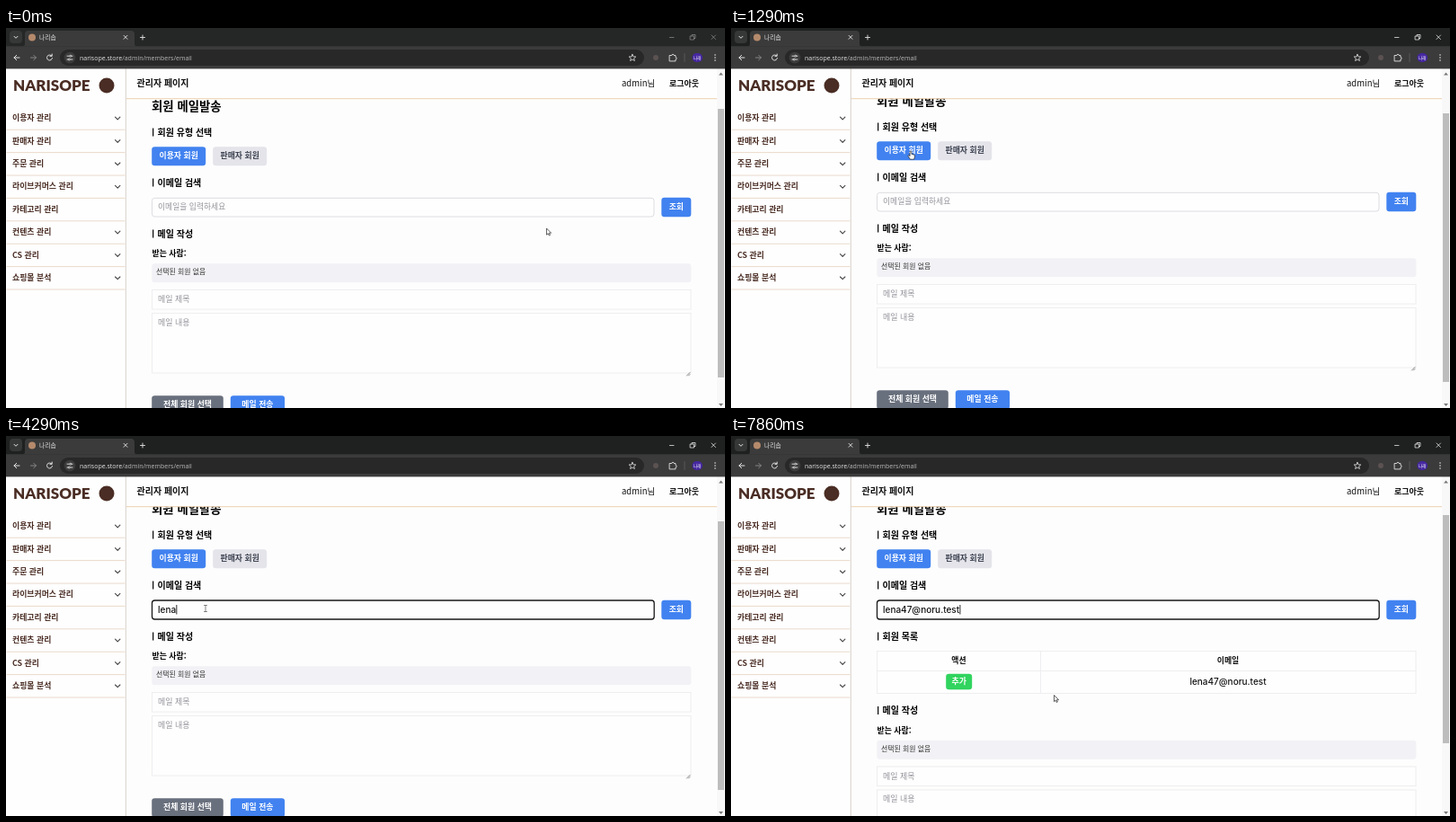
Recreate the animation shown at these times as an HTML page. Size 800 px wide and 423 px high, loop 8 s.

```html
<!DOCTYPE html>
<html lang="ko">
<head>
<meta charset="utf-8">
<style>
  html, body { margin: 0; width: 100%; height: 100%; overflow: hidden; background: #fdfdfd; }
  svg { display: block; font-family: "Noto Sans CJK KR", "Noto Sans", sans-serif; }
  text { white-space: pre; }
  .url { font-family: "Open Sans", sans-serif; }
  .brand { font-family: Lato, sans-serif; }
  .mail { font-family: Inter, sans-serif; }
</style>
</head>
<body>
<svg id="stage" width="800" height="423" viewBox="0 0 800 423"></svg>
<script>
const stage = document.getElementById('stage');
const TICKS = 56, TICK_MS = 1000 / 7;
const EMAIL = 'lena47@noru.test';
const KEY_TICKS = [26, 27, 28, 29, 31, 32, 35, 37, 39, 40, 42, 43, 44, 45, 46, 47];
const CARET_TOGGLES = [11, 14, 18, 21, 24, 51, 55];
const PATH = [[0, 601.5, 223], [4, 255.5, 142], [6, 255.5, 142], [8, 200, 137],
              [9, 200, 137], [11, 222, 192], [51, 222, 192], [53, 345, 278], [55, 359.5, 288.5]];
const MENU = ['이용자 관리', '판매자 관리', '주문 관리', '라이브커머스 관리',
              '카테고리 관리', '컨텐츠 관리', 'CS 관리', '쇼핑몰 분석'];
const BLUE = '#4182f0', BROWN = '#4a2d24', BORDER = '#eeeef0', HINT = '#94949c';

const rect = (x, y, w, h, fill, r = 0, more = '') =>
  `<rect x="${x}" y="${y}" width="${w}" height="${h}" rx="${r}" fill="${fill}" ${more}/>`;
const box = (x, y, w, h, color = BORDER, r = 0, width = 1) =>
  rect(x, y, w, h, '#fefefe', r, `stroke="${color}" stroke-width="${width}"`);
const line = (d, color, width = 1) =>
  `<path d="${d}" fill="none" stroke="${color}" stroke-width="${width}" stroke-linecap="round" stroke-linejoin="round"/>`;
const dot = (x, y, r, fill) => `<circle cx="${x}" cy="${y}" r="${r}" fill="${fill}"/>`;
// Text is placed by its vertical middle.
const text = (x, y, s, size = 8.9, fill = '#111', weight = 700, more = '') =>
  `<text x="${x}" y="${(y + size * .36).toFixed(2)}" font-size="${size}" fill="${fill}" font-weight="${weight}" ${more}>${s}</text>`;
const middle = 'text-anchor="middle"';
const button = (x, y, w, h, label, fill = BLUE, color = '#fff') =>
  rect(x, y, w, h, fill, 3.3) + text(x + w / 2, y + h / 2 - .5, label, 8.9, color, 700, middle);
const heading = (y, s) => rect(163, y - 4.5, 1.3, 9, '#111') + text(168.5, y, s, 10, '#000', 900);

function mailForm(dy) {
  return `<g transform="translate(0 ${dy})">` +
    heading(223, '메일 작성') +
    text(162.5, 245, '받는 사람:', 8.9, '#000', 900) +
    rect(162.3, 256.3, 600, 21, '#f2f1f5', 3) +
    text(167, 265.5, '선택된 회원 없음', 7.9, '#333', 500) +
    box(162.5, 285.5, 599.5, 21.5) + text(169, 295.8, '메일 제목', 9, HINT, 500) +
    box(162.5, 311.5, 599.5, 66.5) + text(169, 321.5, '메일 내용', 9, HINT, 500) +
    line('M757.5 381L761 377.5M759.5 381L761 379.5', '#555', .7) +
    button(162.2, 403.2, 79.6, 21, '전체 회원 선택', '#69707d') +
    button(249.8, 403.2, 60.3, 21, '메일 전송') + '</g>';
}

function results(typed) {
  return heading(223, '회원 목록') + box(162.5, 239.5, 599.5, 47) +
    line('M162.5 261.5H762M344.5 239.5V286.5', BORDER) +
    text(253.5, 250, '액션', 8.9, '#111', 700, middle) +
    text(553, 250, '이메일', 8.9, '#111', 700, middle) +
    button(239.2, 264.8, 29, 17.4, '추가', '#30d45e') +
    text(553, 273, typed, 10, '#111', 500, `${middle} class="mail"`);
}

function mainPage(tick, typed, found) {
  const seller = tick >= 4 && tick < 8, focused = tick >= 11;
  const tab = (x, label, on) =>
    button(x, 126.2, 60, 21, label, on ? BLUE : '#e4e4ea', on ? '#fff' : '#3c4250');
  return `<g transform="translate(0 ${tick < 2 ? 6 : 0})">` +
    text(162, 81.5, '회원 메일발송', 13.4, '#000', 900) +
    heading(110, '회원 유형 선택') +
    tab(162.2, '이용자 회원', !seller) + tab(230.2, '판매자 회원', seller) +
    heading(166, '이메일 검색') +
    (focused ? box(162.5, 183, 558.7, 21, '#181818', 3, 1.3) : box(162.5, 183.3, 558.5, 20.7, '#dddde2', 3)) +
    (typed ? text(169, 193, typed, 10, '#111', 500, 'id="typed" class="mail"')
           : text(169, 192.7, '이메일을 입력하세요', 8.8, HINT, 500)) +
    rect(169, 188, .9, 10.5, '#111', 0, 'id="caret"') +
    button(729.3, 182.8, 33, 21.4, '조회') +
    (found ? results(typed) : '') + mailForm(found ? 82.5 : 0) + '</g>';
}

function frame(tick, found) {
  const menu = MENU.map((label, i) => {
    const y = 100 + 25.4 * i;
    return text(7, y, label, 8.9, BROWN) + line(`M1 ${y + 13.2}H132`, '#eadaca') +
      (i === 4 ? '' : line(`M121.5 ${y - .8}l2.7 2.7l2.7 -2.7`, '#444', 1.1));
  }).join('');
  const [top, height] = found ? [88, 254] : tick < 2 ? [90, 299] : [95, 299];
  return rect(134, 45, 657, 33.5, '#fefefe') + line('M134 78.7H791', '#eed2ae') +
    text(145.5, 61.5, '관리자 페이지', 10) +
    text(685, 61.5, 'admin님', 9.5, '#111', 500) + text(738, 61.5, '로그아웃', 9, '#111', 700) +
    rect(0, 45, 133, 378, '#fefefe') + line('M133.3 45V423', '#d6cfc9') +
    text(8, 64, 'NARISOPE', 17, BROWN, 900, 'class="brand"') + dot(112, 64, 8.5, BROWN) + menu +
    rect(791, 45, 9, 378, '#f8f8f8') + rect(792, top, 7, height, '#bdbdbd') +
    '<path d="M793 52.5h5l-2.5 -3zM793 418h5l-2.5 3z" fill="#777"/>';
}

function browser(active) {
  const light = '#e4e4e4', grey = '#858585', control = active ? light : grey;
  return rect(0, 0, 800, 21, active ? '#1f2020' : '#252626') + rect(0, 20.3, 800, 25.1, '#3b3b3b') +
    rect(4, 3, 14, 14, '#363737', 4) + line('M9 9.3l2 2l2 -2', light) +
    '<path d="M18 20.5q3 0 3-3V7q0-4 4-4h114q4 0 4 4v10.5q0 3 3 3z" fill="#3b3b3b"/>' +
    dot(29, 10.5, 4, '#b58a6c') + text(37, 10.7, '나리솝', 6.8, light, 400) +
    line('M131 8.3l4 4m0 -4l-4 4M149.5 10.5h5m-2.5 -2.5v5', light, .9) +
    line('M738.5 10.5h4.5M785 8l4.5 4.5m0 -4.5l-4.5 4.5M761.5 9h4v4h-4zM763 9V7.5h4V11.5h-1.5', control, .8) +
    line('M15 33H9m2.7 -2.7L9 33l2.7 2.7M50.8 31a3 3 0 1 0 .7 2.5M51.2 29v2.3h-2.3', light) +
    line('M27.5 33h6m-2.7 -2.7l2.7 2.7l-2.7 2.7', grey) +
    rect(60, 24, 650, 18, '#282828', 9) + dot(71, 33, 6.3, '#3c3c3c') +
    line('M68 31.2h2.5M73 31.2h1M68 35h1M71.5 35h2.5', light, .9) +
    `<g fill="none" stroke="${light}" stroke-width=".8"><circle cx="71.8" cy="31.2" r="1"/><circle cx="70.2" cy="35" r="1"/></g>` +
    text(82, 33, 'narisope.store<tspan fill="#b9b9b9">/admin/members/email</tspan>', 7, light, 400, 'class="url"') +
    line('M697 29.3l1.1 2.5l2.7 .2l-2.1 1.8l.7 2.7l-2.4 -1.5l-2.4 1.5l.7 -2.7l-2.1 -1.8l2.7 -.2z', light, .8) +
    dot(723, 33, 3, '#5c5252') +
    line('M738.5 30.5h2.3a1.2 1.2 0 0 1 2.4 0h1.8v2a1.2 1.2 0 0 1 0 2.4v2h-6.5z', light, .9) +
    line('M755 28.5v9', '#666', .7) + rect(763.5, 28, 11.5, 10, '#4527a0', 5) +
    text(769.2, 33, '나래', 4.5, '#fff', 400, middle) +
    [30, 33, 36].map(y => dot(789, y, .8, light)).join('');
}

function pointer(tick) {
  const i = Math.max(1, PATH.findIndex(p => p[0] >= tick));
  const [t0, x0, y0] = PATH[i - 1], [t1, x1, y1] = PATH[i];
  const k = (tick - t0) / (t1 - t0), e = k * k * (3 - 2 * k);
  const hand = 'M-.9 .5Q0 -.7 .9 .5V3.3L4 4.2Q4.8 4.6 4.5 6L3.7 9.2H-.6L-3 5.5Q-2.8 4.3 -1.9 4.8L-.9 5.6Z';
  const arrow = 'M0 0V7.2L1.7 5.7L2.8 8L3.9 7.5L2.9 5.2H5.1Z';
  const shape = tick >= 10 && tick < 51
    ? line('M-1.5 -3.5H1.5M0 -3.5V3.5M-1.5 3.5H1.5', '#555', .7)
    : `<path d="${tick >= 3 && tick < 10 ? hand : arrow}" fill="#fff" stroke="#222" stroke-width=".7"/>`;
  return `<g transform="translate(${x0 + (x1 - x0) * e} ${y0 + (y1 - y0) * e})">${shape}</g>`;
}

function render(tick) {
  const typed = EMAIL.slice(0, KEY_TICKS.filter(k => k <= tick).length);
  const found = tick >= 50;
  stage.innerHTML = rect(0, 0, 800, 423, '#fdfdfd') + mainPage(tick, typed, found) +
    frame(tick, found) + browser(tick >= 2) + pointer(tick);
  const caret = document.getElementById('caret');
  const caretOn = CARET_TOGGLES.filter(k => k <= tick).length % 2;
  caret.setAttribute('visibility', caretOn ? 'visible' : 'hidden');
  if (typed) caret.setAttribute('x', 169.3 + document.getElementById('typed').getComputedTextLength());
}

let shown = -1;
const start = performance.now();
function loop() {
  const time = (performance.now() - start) % (TICKS * TICK_MS);
  const tick = Math.floor((time + 5) / TICK_MS) % TICKS;
  if (tick !== shown) render(shown = tick);
  requestAnimationFrame(loop);
}
loop();
</script>
</body>
</html>
```
